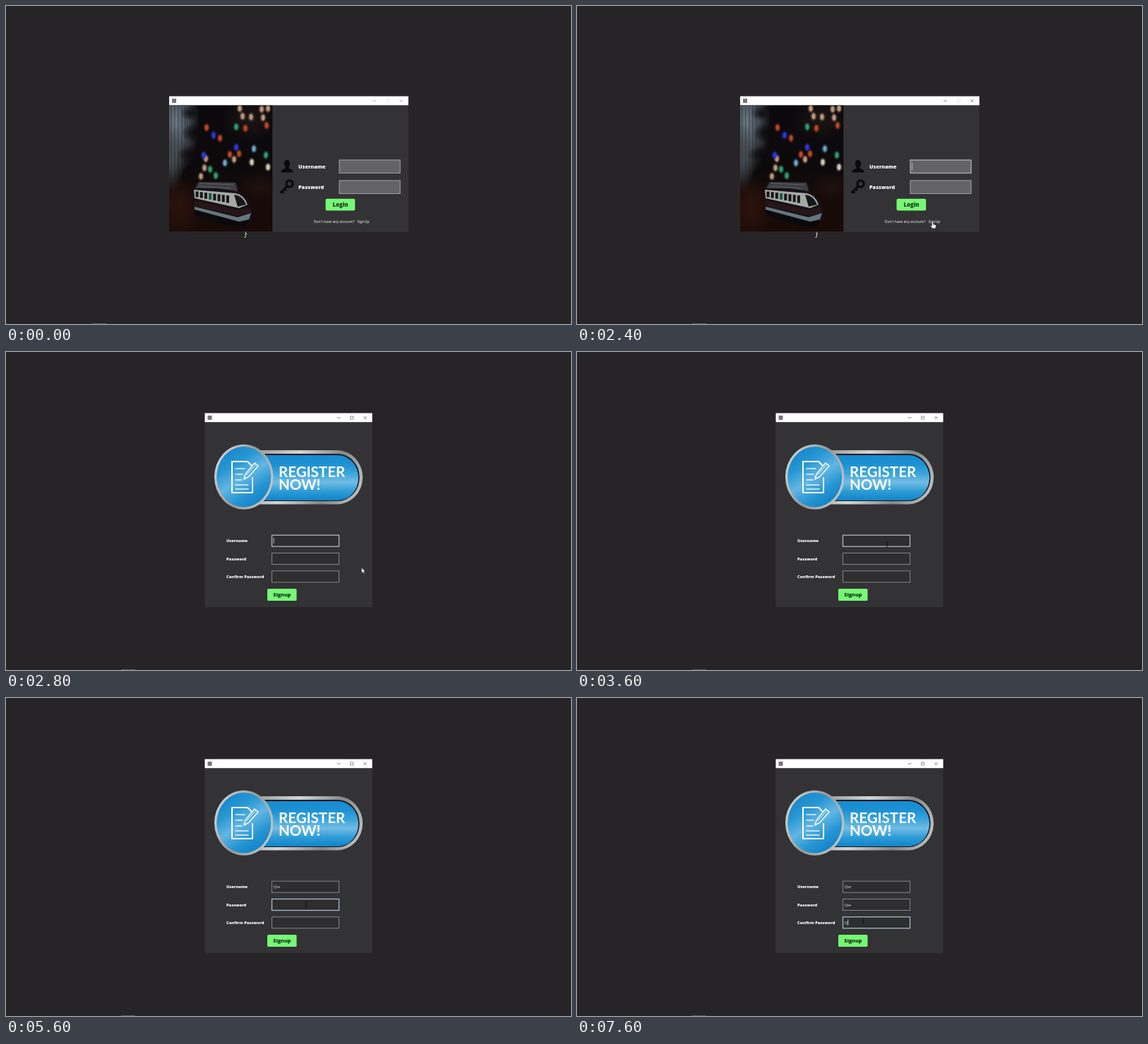
An HTML page with a canvas that plays this animation: 800 px wide and 450 px high, repeating every 8 s.

```html
<!DOCTYPE html>
<html lang="en">
<head>
<meta charset="utf-8">
<title>Sign-up form</title>
<style>
  html, body { margin: 0; width: 100%; height: 100%; overflow: hidden; background: #262427; }
  canvas { display: block; }
</style>
</head>
<body>
<canvas id="stage" width="800" height="450"></canvas>
<script>
const W = 800, H = 450, LOOP = 8000, STEP = 200;
const SANS = '"Open Sans", "Noto Sans", sans-serif';
const MONO = '"DejaVu Sans Mono", monospace';
const NAME = 'Qw';
const stage = document.getElementById('stage').getContext('2d');
const layer = document.createElement('canvas');
layer.width = W;
layer.height = H;
const layerCtx = layer.getContext('2d');
let c = stage;

function rect(x, y, w, h, fill) {
  c.fillStyle = fill;
  c.fillRect(x, y, w, h);
}
function text(str, x, y, font, fill, align = 'left') {
  c.font = font;
  c.fillStyle = fill;
  c.textAlign = align;
  c.textBaseline = 'alphabetic';
  c.fillText(str, x, y);
}
function ellipse(x, y, rx, ry, fill) {
  c.beginPath();
  c.ellipse(x, y, rx, ry, 0, 0, Math.PI * 2);
  c.fillStyle = fill;
  c.fill();
}
function round(x, y, w, h, r, fill) {
  c.beginPath();
  c.roundRect(x, y, w, h, r);
  c.fillStyle = fill;
  c.fill();
}
function shape(path, fill, stroke, width = 1) {
  const p = new Path2D(path);
  if (fill) { c.fillStyle = fill; c.fill(p); }
  if (stroke) { c.strokeStyle = stroke; c.lineWidth = width; c.stroke(p); }
}
function gradient(x0, y0, x1, y1, colors) {
  const g = c.createLinearGradient(x0, y0, x1, y1);
  colors.forEach((color, i) => g.addColorStop(i / (colors.length - 1), color));
  return g;
}
function glow(x, y, rx, ry, color) {
  c.save();
  c.translate(x, y);
  c.scale(rx, ry);
  const g = c.createRadialGradient(0, 0, 0, 0, 0, 1);
  g.addColorStop(0, color);
  g.addColorStop(0.4, color + 'b0');
  g.addColorStop(1, color + '00');
  ellipse(0, 0, 1, 1, g);
  c.restore();
}

function drawWallpaper(barX) {
  rect(0, 0, W, H, '#262427');
  const plain = '#dcdcdc', blue = '#6a9fe0', rose = '#b06a78';
  const line = (row, col, str, fill = plain, italic = '') =>
    text(str, 336 + col * 6.62, 141 + row * 14.2, `${italic} 11px ${MONO}`, fill);
  line(0, 0, 'bool dead');
  line(0, 10, '=', rose);
  line(0, 12, 'false', blue);
  line(0, 17, ';');
  line(2, 0, 'void', plain, 'italic');
  line(2, 5, 'goDeeper()');
  line(3, 0, '{');
  line(4, 4, 'if', rose);
  line(4, 6, '(dead');
  line(4, 12, '==', rose);
  line(4, 15, 'true', blue);
  line(4, 19, ')');
  line(5, 8, 'return', rose);
  line(5, 14, ';');
  line(7, 4, 'goDeeper();');
  line(8, 0, '}');
  line(10, 0, 'int', plain, 'italic');
  line(10, 4, 'main(');
  line(10, 9, 'void', plain, 'italic');
  line(10, 13, ')');
  line(11, 0, '{');
  line(12, 4, 'goDeeper();');
  line(13, 0, '}');
  rect(barX, 449, 20, 1, '#5c5a5d');
}

function drawFrame(x, y, w, h, buttons, ink, maxInk) {
  rect(x, y, w, h, '#333234');
  rect(x, y, w, 12.7, '#fff');
  rect(x + 4, y + 3.5, 6, 6, '#77757a');
  const my = y + 6.5, [a, b, d] = buttons;
  shape(`M${a - 2.5} ${my}h5`, null, ink, 0.8);
  shape(`M${b - 2} ${my - 2}h4v4h-4z`, null, maxInk, 0.7);
  shape(`M${d - 2} ${my - 2}l4 4m0 -4l-4 4`, null, ink, 0.8);
}

function drawField(x, y, w, h, fill, border, focused) {
  rect(x, y, w, h, fill);
  c.strokeStyle = focused || border;
  c.lineWidth = focused ? 1.3 : 1;
  c.strokeRect(x + 0.5, y + 0.5, w - 1, h - 1);
}

function drawPhoto() {
  const x = 231, y = 140.5, w = 146.5, h = 179;
  c.save();
  c.beginPath();
  c.rect(x, y, w, h);
  c.clip();
  rect(x, y, w, h, gradient(0, y, 0, y + h, ['#0b090c', '#0c0a0d', '#0d090a', '#170b09', '#180a07']));

  // window light behind the curtain, then the tree in front of it
  glow(240, 165, 34, 75, '#6b7a85');
  glow(233, 215, 20, 50, '#4a4f55');
  for (let i = 0; i < 5; i++) rect(233 + i * 5, y, 1.5, 108, '#12151a50');
  glow(262, 152, 16, 10, '#121013');
  glow(268, 180, 20, 14, '#0c0a0d');
  glow(262, 210, 20, 13, '#0c0a0d');
  glow(345, 160, 40, 30, '#1c1413');
  glow(245, 285, 32, 45, '#2c130d');
  glow(360, 255, 30, 20, '#1f1110');

  const lights = {
    '#b8957a': [[331, 145], [362, 146], [371, 145], [335, 156], [347, 157], [364, 158], [283, 216], [323, 217], [276, 241], [281, 229]],
    '#2a36dd': [[280, 211], [294, 183], [326, 200]],
    '#b94426': [[284, 172], [303, 187], [330, 209], [369, 169], [339, 173], [317, 210]],
    '#2b9a70': [[326, 171], [297, 240], [289, 231], [368, 211]],
    '#67a3cc': [[351, 202], [310, 222]],
    '#cbc6b6': [[348, 221], [371, 228]]
  };
  for (const [color, points] of Object.entries(lights))
    for (const [px, py] of points) {
      glow(px, py, 5, 7, color + '');
      ellipse(px, py, 2.2, 3.7, color);
    }

  // toy train
  shape('M265 260L269 249L326 249L330 263L345 275L349 300L339 313L268 292Z', '#151116');
  shape('M268 258L273 249L325 250L328 262L300 258Z', '#3b3d40');
  shape('M275 251L322 253M273 255L318 258', null, '#686b6e', 0.8);
  shape('M266 260L325 265Q337 267 342 281L330 286L267 272Z', '#a4a9a5');
  for (let i = 0; i < 8; i++) {
    const wx = 268.5 + i * 6.2;
    rect(wx, 262.5 + i * 0.8, 4, 8 + i * 0.35, i === 3 ? '#1c5740' : '#17161b');
  }
  shape('M323 267Q335 268 340 281L328 284Z', '#17161b');
  shape('M267 275L328 289L344 285L347 292L329 297L267 283Z', '#261519');
  shape('M267 284L328 299L347 293L344 302L330 305L267 288Z', '#66777c');
  shape('M267 289L330 306L345 304L339 313L311 310L268 296Z', '#0b090b');
  c.restore();
}

function drawLogin(active) {
  drawFrame(231, 127.7, 338.7, 192, [521.5, 540.5, 559.5], active ? '#666' : '#aaa', '#ddd');
  drawPhoto();
  const black = '#0b0a0b';
  ellipse(398, 223, 4.2, 5.2, black);
  shape('M395.5 226h5v4q6 1 6 5.5h-17q0 -4.5 6 -5.5z', black);
  c.beginPath();
  c.arc(401.5, 251.5, 4.6, 0, Math.PI * 2);
  c.strokeStyle = black;
  c.lineWidth = 3.2;
  c.stroke();
  shape('M398 255L388.5 264.5M391 262l2.5 2.5M394.5 258.5l2.5 2.5', null, black, 3);

  const label = `800 7.3px ${SANS}`;
  text('Username', 414, 229.7, label, '#fff');
  text('Password', 414, 258.5, label, '#fff');
  drawField(471.5, 217.5, 87, 19.5, '#636264', '#9c9b9d', active && '#a6abae');
  drawField(471.5, 246.5, 87, 19.5, '#636264', '#9c9b9d');
  if (active) rect(474, 222, 0.8, 10, '#ccc');
  round(452.5, 272.8, 41.7, 16.7, 2, '#76f876');
  text('Login', 473.4, 284, `800 7.8px ${SANS}`, '#173518', 'center');
  const small = `5.1px ${SANS}`;
  text("Don't have any account?", 435.7, 307, small, '#fff');
  text('SignUp', 497.5, 307, small, '#fff');
}

function drawBanner() {
  const silver = gradient(295, 131, 505, 222, ['#dfe0df', '#969897', '#d5d6d4', '#858786', '#cfd0ce']);
  const corner = { x: 36, y: 38 };
  round(345, 139, 160, 76.5, [0, corner, corner, 0], silver);
  round(350, 144, 150.5, 67, [0, { x: 31, y: 33 }, { x: 31, y: 33 }, 0], '#101820');
  round(352, 146, 147, 64, [0, { x: 29, y: 32 }, { x: 29, y: 32 }, 0],
    gradient(0, 146, 0, 210, ['#168bd0', '#1d91d2', '#3ba4db', '#72bce4', '#2d9bd6', '#1185ca']));
  ellipse(336.7, 176.7, 41.7, 46, silver);
  ellipse(336.7, 176.7, 38.5, 42.7,
    gradient(312, 138, 362, 216, ['#1687cb', '#2796d4', '#62b6e3', '#2595d3', '#0f80c5']));

  c.lineJoin = c.lineCap = 'round';
  shape('M342 155H320V199H349V178M342 155L348 161', null, '#fff', 2);
  shape('M325 165h13M325 173h10M325 181h9M325 188h18M325 194h18', null, '#e8f5fc', 1.4);
  shape('M337 180L339 173L352 157L357 161L344 176Z', '#4aa9dc', '#fff', 1.5);
  shape('M341 174L354 159', null, '#fff', 1);
  c.lineJoin = 'miter';
  c.lineCap = 'butt';
  const bold = '700 20.5px Lato, sans-serif';
  text('REGISTER', 386, 176.5, bold, '#fff');
  text('NOW!', 386, 195, bold, '#fff');
}

function drawSignup(t) {
  drawFrame(281.5, 86.5, 237, 274.5, [471, 489.5, 508.5], '#666', '#666');
  drawBanner();
  const focus = t < 5200 ? 0 : t < 7000 ? 1 : 2;
  const caretOn = !(t >= 3600 && t < 4200) && t !== 5600;
  const starts = [4200, 5800, 7600];
  ['Username', 'Password', 'Confirm Password'].forEach((label, i) => {
    const y = 258.7 + i * 25.3;
    text(label, 312, y + 10.5, `800 5.7px ${SANS}`, '#fff');
    const edge = t < 4200 ? '#b5b6b8' : '#a9bac8';
    drawField(376, y, 96, 17, '#2e2d2f', '#858487', i === focus && edge);
    const count = Math.max(0, Math.min(NAME.length, (t - starts[i]) / STEP + 1));
    const typed = NAME.slice(0, count);
    text(typed, 378.5, y + 10.7, `6px ${SANS}`, '#ddd');
    if (i === focus && caretOn)
      rect(378.7 + c.measureText(typed).width, y + 4, 0.8, 8.5, '#ddd');
  });
  round(370, 335, 41.5, 17, 1.5, '#76f876');
  text('Signup', 390.8, 346.2, `800 7.2px ${SANS}`, '#173518', 'center');
}

function drawCursor(t) {
  if (t < 200) return;
  const keys = [
    [200, 642, 350], [1200, 509, 310], [1800, 503.5, 305.3], [2800, 503.5, 305.3],
    [3200, 454, 268], [3600, 439, 273], [4600, 439, 273], [5200, 425, 292],
    [5600, 425, 292], [6200, 462, 291], [6400, 462, 291], [7000, 464, 321],
    [7400, 464, 321], [7600, 405, 315], [8000, 405, 315]
  ];
  const i = keys.findIndex(k => k[0] > t);
  const [t0, x0, y0] = keys[i - 1], [t1, x1, y1] = keys[i];
  const p = (t - t0) / (t1 - t0);
  c.save();
  c.translate(x0 + (x1 - x0) * p, y0 + (y1 - y0) * p);
  if (t >= 3200) {
    shape('M-1.5 -3.5h3M0 -3.5v7M-1.5 3.5h3', null, '#0c0c0e', 0.8);
  } else if (t >= 1200 && t < 2600) {
    shape('M-1 .5q1 -1 2 0v3.2l3 .8q1 .3 .8 1.5l-.8 3.5h-4.5l-2.7 -4q.5 -1 2.2 .4z', '#fff', '#222', 0.5);
  } else {
    shape('M0 0V7.3L1.7 5.8L2.9 8.4L4 7.9L2.9 5.3H5Z', '#fff', '#222', 0.4);
  }
  c.restore();
}

function blend(draw, alpha, scale) {
  layerCtx.clearRect(0, 0, W, H);
  c = layerCtx;
  draw();
  c = stage;
  c.save();
  c.globalAlpha = alpha;
  c.translate(400.2, 223.7);
  c.scale(scale, scale);
  c.drawImage(layer, -400.2, -223.7);
  c.restore();
}

function render(now) {
  const t = Math.floor((now % LOOP) / STEP) * STEP;
  drawWallpaper(t < 200 ? 122 : 163);
  if (t < 2600) {
    drawLogin(t >= 200);
  } else if (t < 2800) {
    blend(() => drawLogin(true), 0.18, 0.957);
    blend(() => drawSignup(t), 0.58, 0.979);
  } else {
    drawSignup(t);
  }
  drawCursor(t);
}

const begin = performance.now();
function tick() {
  render(performance.now() - begin);
  requestAnimationFrame(tick);
}
tick();
</script>
</body>
</html>
```
